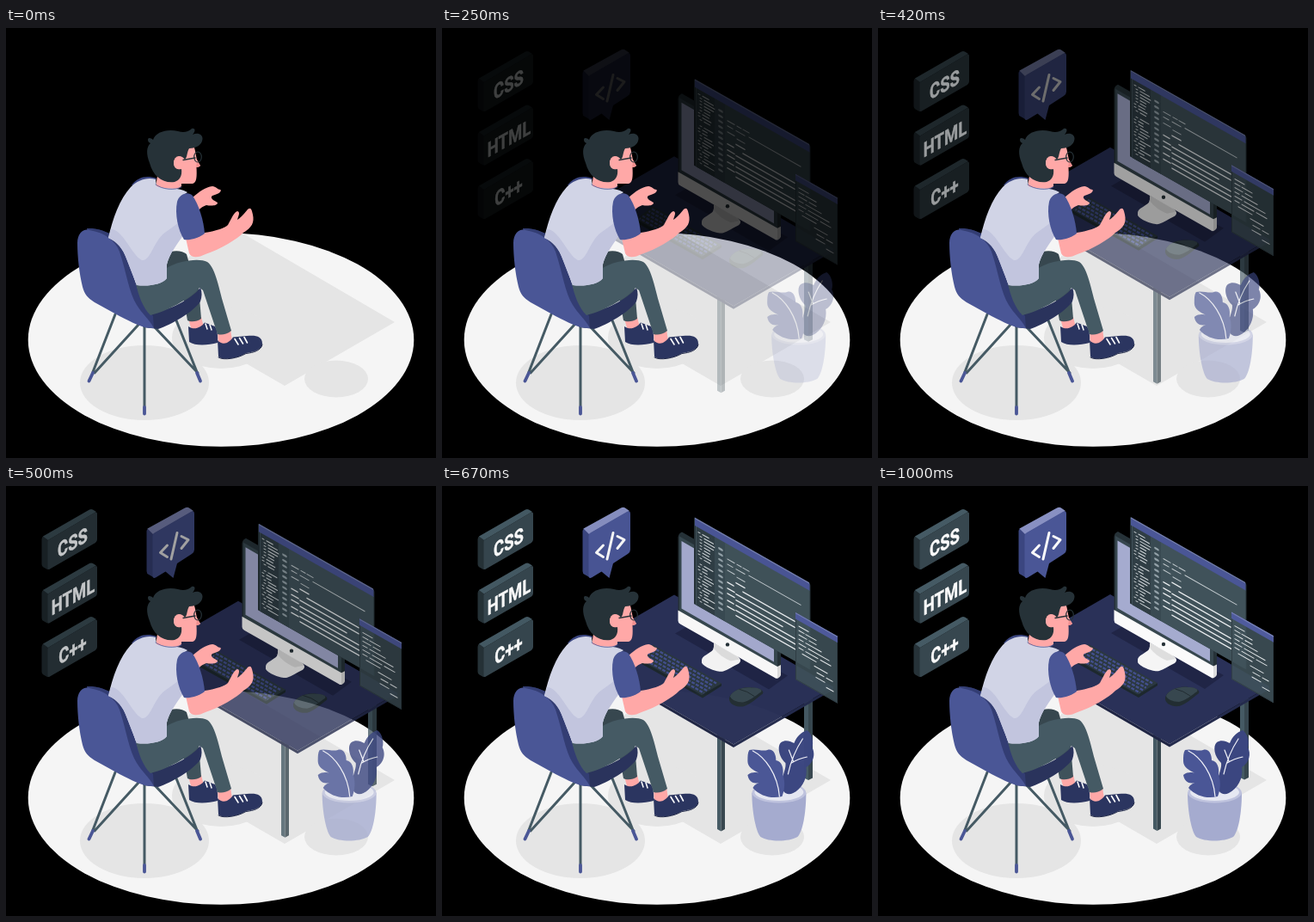
An HTML page for the animation above (1.04 s loop, 500x500 px).

```html
<!DOCTYPE html>
<html lang="en">
<head>
<meta charset="utf-8">
<title>Developer at a desk</title>
<style>
  html, body { margin: 0; width: 100%; height: 100%; overflow: hidden; background: #000; }
  svg { display: block; width: 100vw; height: 100vh; }
  .tag { font: 700 24px Roboto, Inter, sans-serif; fill: #fafafa; stroke: #fafafa; stroke-width: .5; text-anchor: middle; }
  .line { fill: none; stroke-linecap: round; stroke-linejoin: round; }
</style>
</head>
<body>
<svg viewBox="0 0 500 500">
  <defs>
    <clipPath id="floorClip"><ellipse cx="250" cy="362.5" rx="224.3" ry="124.3"/></clipPath>
    <g id="plate">
      <path fill="#263238" d="M41.500 62 Q41.500 59 44 58 L50 63 L50 97 L48 97 L43.500 94.500 Q41.500 93.500 41.500 91Z"/>
      <path fill="#455a64" d="M43 58.500 L97 27.500 Q99 26.500 101 27.500 L105 30 L49 63Z"/>
      <path fill="#37474f" d="M48.500 65 Q48.500 63 50.500 62 L103 31 Q106 29.500 106 32 L106 62 Q106 64.500 104 66 L51 96.500 Q48.500 98 48.500 95Z"/>
    </g>
  </defs>

  <!-- floor -->
  <ellipse cx="250" cy="362.5" rx="224.3" ry="124.3" fill="#f5f5f5"/>
  <g fill="#e5e5e5">
    <path clip-path="url(#floorClip)" d="M452 342 L324 416 L139 309 L267 234Z"/>
    <ellipse cx="161" cy="412.5" rx="75" ry="43.5"/>
    <ellipse cx="250" cy="360" rx="57" ry="36"/>
    <ellipse cx="384" cy="408" rx="37" ry="21.5"/>
  </g>

  <!-- tags and speech bubble -->
  <g id="plates">
    <use href="#plate"/>
    <use href="#plate" y="62.500"/>
    <use href="#plate" y="125"/>
  </g>
  <g id="tags">
    <text class="tag" transform="matrix(.77 -.432 0 1 77.500 74)">CSS</text>
    <text class="tag" transform="matrix(.77 -.432 0 1 78 136.500)">HTML</text>
    <text class="tag" transform="matrix(.77 -.432 0 1 77.500 199)">C++</text>
  </g>
  <g id="bubble">
    <path fill="#3b4680" d="M163.500 52 L165 49 L172 55 L173 107 L166 103 Q163.500 102 163.500 99Z"/>
    <path fill="#8890c2" d="M164.500 49.500 L208 25.500 Q211 24 213 25.500 L218 29 L171 56Z"/>
    <path fill="#4a5696" d="M170.500 58 Q170.500 55.500 172.500 54.500 L215 30 Q219 28 219 32 L219 74 Q219 77 216 79 L199 90 L194.500 107 L185.500 99.500 L174 106.500 Q170.500 108 170.500 104Z"/>
    <path class="line" stroke="#fafafa" stroke-width="3" d="M187.500 69 L179.500 77.500 L187.500 82.500 M199 54.500 L192 85 M204 58.500 L212 62.500 L204 72.500"/>
  </g>

  <!-- desk -->
  <g id="desk">
    <path fill="#455a64" d="M320 288 H324.500 V401 L320 398.500Z M421 240 H426 V341.500 L421 339Z"/>
    <path fill="#37474f" d="M324.500 288 H329 V398.500 L324.500 401Z M426 240 H431 V339 L426 341.500Z"/>
    <path fill="#2a3158" d="M270 126 L455 233 L339 300 L154 193Z"/>
    <path fill="#1f2544" d="M154 193 L339 300 V303.500 L154 196.500Z"/>
    <path fill="#242b4d" d="M339 300 L455 233 V236.500 L339 303.500Z"/>
    <path fill="#202546" d="M271 171 L290 160 L402 220 L380 236 L340 213 L318 198Z"/>

    <path fill="#1d282d" d="M226 199 L302 242 L325 229 V232 L303 246 L226 203Z"/>
    <path fill="#2b383f" d="M245 184 L325 229 L302 242.500 L226 199Z"/>
    <g id="keys" class="line" stroke="#434f8d" stroke-width="2.300" style="stroke-linecap:butt"></g>

    <path fill="#222d32" d="M334 246 C336 238 350 232 361 234 C370 234 375 238 373 241 C366 246 358 254 350 256 C342 257 333 253 334 246Z"/>
    <path fill="#37474f" d="M335 244 C338 237 350 233 360 234 C368 234 373 236 371 239 C365 243 357 250 350 251 C343 251 336 248 335 244Z"/>
    <path class="line" stroke="#222d32" d="M346 236 Q355 238 363 244"/>

    <path fill="#f5f5f5" d="M302 202 C302 197 312 194 315 190 L317 183 L341 196 C347 199 349 203 345 206 C338 209 333 213 327 215 C321 217 304 210 302 205Z"/>
    <path fill="#dedede" d="M316 182 L342 196 L346 201 L336 203 C328 200 320 194 316 188Z"/>
    <path fill="#263238" d="M274.500 59 Q275 54.500 279 53 L394 119 V209 L390 211 L274.500 146Z"/>
    <path fill="#37474f" d="M276 58 L390 123 V210 L276 145Z"/>
    <path fill="#a5abcf" d="M278.500 63.500 L386 125.500 V204 L278.500 142Z"/>
    <path fill="#fafafa" d="M274.500 144 L390 209.500 V223 Q389 224 387 222.500 L277 160 Q274.500 159 274.500 156Z"/>
    <path fill="#dcdcdc" d="M390 209.500 L394 207.500 V219 Q394 221 390 223.500Z"/>
    <circle cx="332" cy="184" r="2.200" fill="#263238"/>

    <!-- code windows, drawn in skewed local axes -->
    <g transform="matrix(1 .568 0 1 293 35.500)">
      <path fill="#263238" d="M0 2 Q0 0 2 0 H133 Q135.500 0 135.500 3 V101 H0Z"/>
      <path fill="#40525a" d="M2 9 H134.500 V101 H2Z"/>
      <path fill="#303e45" d="M3 9 H24 V101 H3Z"/>
      <path fill="#394a52" d="M24 9 H36 V101 H24Z"/>
      <path fill="#4a5696" d="M1 1.500 H134.500 V9.500 H1Z"/>
      <path fill="#7780b5" d="M1 .3 H134 V1.700 H1Z"/>
      <g id="mainCode" class="line"></g>
    </g>
    <g transform="matrix(1 .568 0 1 411 146.500)">
      <path fill="#40525a" fill-opacity=".88" d="M0 0 H49 V78 H0Z"/>
      <path class="line" stroke="#303e45" d="M.5 8 V77.500 H48.500 V8"/>
      <path fill="#4f5b9d" d="M0 0 H49 V7.500 H0Z"/>
      <path fill="#7780b5" d="M0 0 H49 V1.300 H0Z"/>
      <g id="sideCode" class="line"></g>
    </g>
  </g>

  <!-- plant -->
  <g id="plant">
    <path fill="#a5abcf" d="M360 357 C360 380 365 403 370 408 C380 414 402 414 413 408 C419 402 423 380 423 357Z"/>
    <ellipse cx="391.500" cy="356.500" rx="31.500" ry="12" fill="#bfc3de"/>
    <ellipse cx="391.500" cy="356" rx="28.500" ry="10" fill="#e6e8f2"/>
    <path fill="#3b4680" d="M424 284 C430 288 432 298 430 304 C434 311 432 322 423 327 C425 340 418 352 408 357 C400 361 394 355 394 345 C396 335 400 328 399 322 C391 315 389 302 394 298 C400 294 406 298 409 299 C412 291 418 286 424 284Z"/>
    <path fill="#4a5696" d="M357 307 C364 305 372 309 378 307 C384 305 388 311 388 319 C395 320 397 328 396 336 C399 344 398 354 395 361 C383 364 370 361 361 351 C363 347 367 345 371 344 C364 347 357 346 355 336 C360 332 366 333 369 334 C362 331 355 327 355 320 C355 314 355 310 357 307Z"/>
    <path class="line" stroke="#f0f1f8" stroke-width="1.200" d="M361 308 C375 315 390 335 392 361 M419 294 Q407 312 402 335 M403 307 L408 320 M424 315 Q414 317 406 322"/>
  </g>

  <!-- chair legs -->
  <g class="line" stroke-width="3">
    <path stroke="#455a64" d="M127 333 L101 400 M154 345 L103 401 M161 340 V440 M198 340 L222 400 M173 348 L223 401"/>
    <path stroke="#4a5696" stroke-width="3.800" d="M101 401 L96.500 410.500 M161 441 V448.500 M222 401 L226 410.500"/>
  </g>

  <!-- far leg -->
  <path fill="#ffa8a7" d="M212 338 L227 336 L230 348 L216 352Z"/>
  <path fill="#2b3560" d="M212 347 C219 352 227 348 231 342.500 L243 347 Q247 352 246 366 C235 369 220 370 213 365Z"/>
  <path class="line" stroke="#fff" stroke-width="1.500" d="M232 344 L234 350 M237 345 L239 351"/>
  <path fill="#37474f" d="M186 264 C193 257 205 259 210 263 L213 274 L186 285Z"/>
  <path fill="#3f525b" d="M206 312 L224 302 L227 338 C222 342 214 342 211 340Z"/>

  <!-- seat and back -->
  <path fill="#2a335c" d="M94 233 C112 232 132 243 138 256 C145 275 150 300 160 320 L168 332 C190 328 215 316 226 302 Q229 309 226 318 C217 331 192 345 177 350 L160 348 L120 300Z"/>
  <path fill="#333d73" d="M94 233 C112 232 132 243 138 256 C145 275 150 300 160 320 L171 335 L172 349 L120 300Z"/>
  <path fill="#4a5696" d="M83 250 C83 239 90 233 97 235 C115 238 127 247 132 260 C140 284 143 308 152 322 C158 332 166 338 172 349 C160 350 148 343 132 335 L103 319 C95 314 91 309 89 301 C85 285 83 265 83 250Z"/>

  <!-- near leg -->
  <path fill="#ffa8a7" d="M246 352 L261 350 L263 364 Q256 370 247 368Z"/>
  <path fill="#2b3560" d="M246 363 C252 370 260 366 264 359.500 L280 358 C290 357 298 358 298 367 C298 374 288 377 279 378 C270 384 252 387 247 382Z"/>
  <path class="line" stroke="#1f2747" d="M247 383 C253 387 270 384 279 378.500 C288 377.500 297 375 298 368"/>
  <path class="line" stroke="#fff" stroke-width="1.600" d="M266 361.500 L270 368 M271.500 360.500 L275.500 367 M277 359.500 L280.500 366"/>
  <path fill="#455a64" d="M151 297 C165 300 180 296 186 288 L187 279 C200 271 224 267 234 272 C243 278 247 300 252 318 L262 352 C256 357 250 357 246 356 L229 305 L225 302 C215 315 185 330 168 334 C159 325 154 311 151 297Z"/>

  <!-- head -->
  <path fill="#3b4680" d="M146 183 C153 173 164 171 175 175 L172 182Z"/>
  <path fill="#ffa8a7" d="M176 172 L204 146 L218 136 C221 145 221 150 222 153 L226 160 Q225 162 221.500 162 C222 172 222 180 217 181 L204 181 V184 C198 190 184 189 174 185Z"/>
  <path fill="#f28f8f" d="M222 155 L226 160 Q224 162 221 162Z"/>
  <path fill="#263238" d="M165 130 C165 127 169 128 171 130 C174 121 187 117 200 120 C206 122 212 121 216 117 C221 116 220 121 217 124 C223 121 229 124 228.500 129 C228 136 221 140 213 140 C210 145 211 150 208 153 C203 146 195 150 195 157 C195 163 199 165 204 164 C205 172 202 177 196 179 C183 181 171 173 167 157 C163 147 163 138 168 134 C166 133 165 132 165 130Z"/>
  <ellipse cx="201" cy="156.500" rx="6" ry="7.500" fill="#ffa8a7"/>
  <path class="line" stroke="#263238" stroke-width="1.300" d="M206 153.500 L220 151"/>
  <ellipse cx="223" cy="150" rx="4.300" ry="6" fill="none" stroke="#263238" stroke-width="1.200"/>

  <!-- torso and arms -->
  <path fill="#ffa8a7" d="M217 197 C225 190 232 185 240 184 C244 184 246 188 249.500 188 C251 191 246 193 240 195 C236 198 243 201 246 203 C246 207 238 207 233 206 C230 207 226 209 224 212Z"/>
  <path fill="#d1d4e6" d="M174 176 C164 173 153 177 145 185 C132 199 124 222 119 244 C130 249 136 257 140 268 L152 299 C165 301 182 298 187 291 V275 C190 262 200 250 206 240 L199 205 C203 195 210 192 211 191 C200 184 190 189 175 184Z"/>
  <path fill="#c2c5de" d="M122 234 C136 234 146 264 158 270 C168 272 172 246 186 237 C194 232 201 226 204 222 L207 240 C200 250 190 262 187 275 V291 C182 298 165 301 152 299 L140 268 C136 257 130 249 119 244Z"/>
  <path class="line" stroke="#4a5696" stroke-width=".8" d="M174 182 C182 188 196 189 204 185"/>
  <path fill="#ffa8a7" d="M208 240 L231 238 C245 236 255 232 258 229 C262 222 265 214 269 213 C273 214 270 219 269 223 C275 219 279 213 281.500 210.500 C285 208 286 212 287 217 C289 226 286 232 276 238 C268 246 250 257 232 263 C224 267 216 268 213 262Z"/>
  <path fill="#4a5696" d="M199 202 C201 194 211 189 217 195 C224 205 230 224 231 239 C223 245 213 247 207 246 C200 235 196 216 199 202Z"/>
</svg>

<script>
const $ = id => document.getElementById(id);
const NS = 'http://www.w3.org/2000/svg';

function stroke(parent, x1, y1, x2, y2, attrs) {
  const el = document.createElementNS(NS, 'path');
  el.setAttribute('d', `M${x1} ${y1}L${x2} ${y2}`);
  for (const key in attrs) el.setAttribute(key, attrs[key]);
  parent.append(el);
}

function seeded(seed) {
  return () => (seed = (seed * 16807) % 2147483647) / 2147483647;
}

// Keyboard rows: one dashed line per row
for (let row = 0; row < 5; row++) {
  const x = 244 - row * 3.6, y = 187 + row * 2.8;
  stroke($('keys'), x, y, x + 75, y + 42.2, { 'stroke-dasharray': '4 1.5', 'stroke-dashoffset': row * 2 });
}

// File tree and line numbers
const rand = seeded(41);
const code = $('mainCode');
for (let y = 15; y < 95; y += 3.6) {
  if (y > 45 && y < 50) continue;
  const x = 5 + Math.floor(rand() * 2) * 2;
  stroke(code, x, y, x + 2, y, { stroke: '#cfd5d8', 'stroke-width': 1 });
  stroke(code, x + 5, y, x + 9 + rand() * 8, y, { stroke: '#cfd5d8', 'stroke-width': 1.2 });
}
for (let y = 20; y < 95; y += 6.3)
  stroke(code, 29.5, y, 32.5, y, { stroke: '#93a1a8', 'stroke-width': 2.6 });

// Code lines: x, y, length
const mainLines = [
  [39, 27, 8], [50, 27, 5], [57, 27, 7], [39, 33, 6], [49, 33, 10], [64, 32, 60],
  [39, 40, 8], [50, 42, 9], [49, 49, 10], [57, 55, 60], [39, 54, 7], [39, 61, 8],
  [49, 62, 68], [39, 67, 8], [49, 69, 54], [49, 75, 68], [39, 75, 7], [49, 81, 69],
  [39, 82, 8], [49, 87, 69]
];
mainLines.forEach(([x, y, len], i) =>
  stroke(code, x, y, x + len, y, { stroke: i < 8 ? '#c3cbcf' : '#eceff1', 'stroke-width': i < 8 ? 1.1 : 1.5 }));

const sideLines = [
  [4, 14, 11], [4, 19, 6], [12, 19, 12], [4, 24, 9], [16, 24, 8], [4, 29, 5], [12, 29, 18],
  [4, 34, 8], [15, 34, 24], [4, 39, 5], [12, 39, 14], [29, 39, 12], [8, 44, 16],
  [22, 50, 15], [25, 56, 8], [36, 56, 7], [24, 62, 10], [36, 67, 8]
];
for (const [x, y, len] of sideLines)
  stroke($('sideCode'), x, y, x + len, y, { stroke: '#e3e7e9', 'stroke-width': 1.1 });

// Entrance: fade plus slide on an overshooting curve; "fade" bends the opacity
const LOOP = 1040, STEP = 1000 / 24, SLIDE = 30;
const parts = [
  { id: 'plates', dx: 0, dy: 0, fade: 1.5 },
  { id: 'tags', dx: 0, dy: 0, fade: 1 },
  { id: 'bubble', dx: 0, dy: 0, fade: 1.5 },
  { id: 'desk', dx: 0, dy: SLIDE, fade: .8 },
  { id: 'plant', dx: SLIDE, dy: 0, fade: .8 }
];

const cubic = (a, b, s) => 3 * a * s * (1 - s) ** 2 + 3 * b * s * s * (1 - s) + s ** 3;

function ease(x) {
  if (x <= 0) return 0;
  if (x >= 1) return 1;
  let lo = 0, hi = 1;
  for (let i = 0; i < 30; i++) {
    const mid = (lo + hi) / 2;
    if (cubic(.36, .5, mid) < x) lo = mid; else hi = mid;
  }
  return cubic(-.01, 1.38, lo);
}

function draw(time) {
  const step = Math.min(24, Math.floor((time % LOOP + 5) / STEP));
  const p = ease(step / 24);
  const shown = Math.min(1, Math.max(0, p));
  for (const { id, dx, dy, fade } of parts) {
    $(id).setAttribute('opacity', shown ** fade);
    $(id).setAttribute('transform', `translate(${dx * (1 - p)} ${dy * (1 - p)})`);
  }
}

const start = performance.now();
function tick() {
  draw(performance.now() - start);
  requestAnimationFrame(tick);
}
tick();
</script>
</body>
</html>
```
